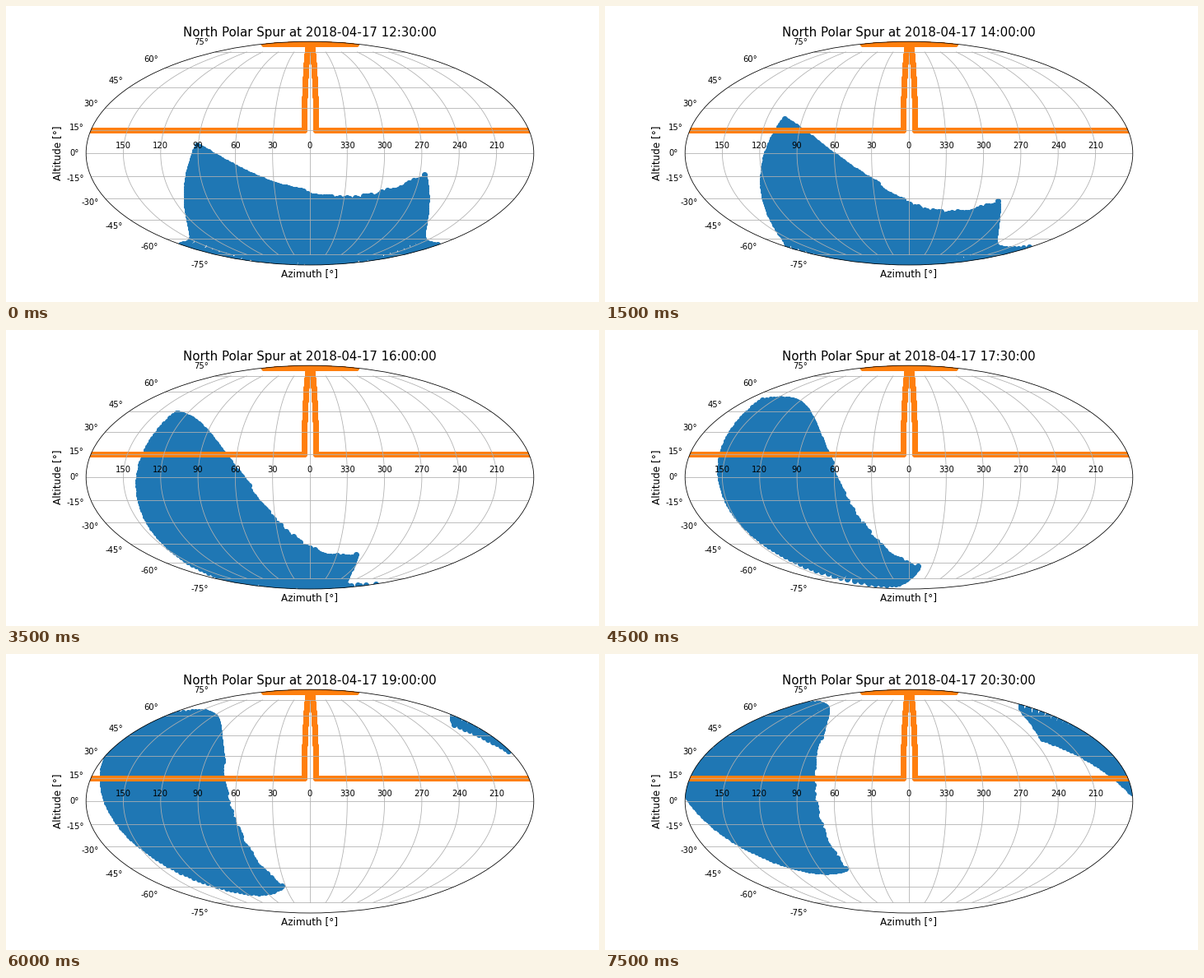
Write a matplotlib script that moves like this. It is 720 by 360 pixels and loops after 8000 ms.

```python
import numpy as np
import matplotlib.pyplot as plt
from matplotlib.animation import FuncAnimation

FRAMES, INTERVAL = 16, 500

# Observing site (degrees) and clock offset from UTC (hours)
LAT, LON, UTC_SHIFT = np.radians(37.9183), -122.1067, 7

# Galactic pole at the epoch of observation and longitude of the celestial pole
POLE_RA, POLE_DEC, POLE_L = np.radians([193.08, 27.03, 122.92])


def spur_grid(step=2.0):
    """Galactic grid over l = 210..380, b = 0..90 with equal spacing on the sky."""
    rows = []
    for b in np.arange(0, 90, step):
        l = np.arange(210, 380.01, step / np.cos(np.radians(b)))
        rows.append(np.column_stack([l, np.full(l.size, b)]))
    return np.radians(np.vstack(rows)).T


def to_equatorial(l, b):
    dl = POLE_L - l
    dec = np.arcsin(np.sin(POLE_DEC) * np.sin(b)
                    + np.cos(POLE_DEC) * np.cos(b) * np.cos(dl))
    ra = POLE_RA + np.arctan2(
        np.cos(b) * np.sin(dl),
        np.cos(POLE_DEC) * np.sin(b) - np.sin(POLE_DEC) * np.cos(b) * np.cos(dl))
    return ra, dec


def sidereal(hour):
    days = 6680.5 + (hour + UTC_SHIFT) / 24
    return np.radians((280.46062 + 360.98564737 * days + LON) % 360)


def to_horizon(ra, dec, hour):
    ha = sidereal(hour) - ra
    alt = np.arcsin(np.sin(LAT) * np.sin(dec)
                    + np.cos(LAT) * np.cos(dec) * np.cos(ha))
    az = np.arctan2(-np.cos(dec) * np.sin(ha),
                    np.sin(dec) * np.cos(LAT)
                    - np.cos(dec) * np.sin(LAT) * np.cos(ha))
    return az, alt


def clock(i):
    # one half-hour step is left out of the sequence
    return 12.5 + 0.5 * i + (0.5 if i >= 9 else 0)


def limits():
    """Outline of the reachable sky, azimuth growing to the left."""
    az = np.linspace(5, 355, 500)
    az = np.where(az > 180, az - 360, az)
    alt = np.linspace(15, 85, 100)
    full = np.linspace(-180, 180, 300)
    x = np.concatenate([-az, full, np.full(100, -5.0), np.full(100, 5.0)])
    y = np.concatenate([np.full(500, 15.0), np.full(300, 85.0), alt, alt])
    return np.radians(x), np.radians(y)


fig = plt.figure(figsize=(10, 5), dpi=72, facecolor="white")
fig.subplots_adjust(left=0.125, right=0.9, bottom=0.125, top=0.88)
ax = fig.add_subplot(projection="mollweide")
ax.set_xticks(np.radians(np.arange(-150, 151, 30)))
ax.set_xticklabels([150, 120, 90, 60, 30, 0, 330, 300, 270, 240, 210])
ax.set_xlabel("Azimuth [°]", fontsize=12)
ax.set_ylabel("Altitude [°]", fontsize=12)
title = ax.set_title("", fontsize=15, y=1.0)
ax.grid(True)

ra, dec = to_equatorial(*spur_grid())
spur = ax.scatter(np.zeros(ra.size), np.zeros(ra.size), color="C0")
ax.scatter(*limits(), color="C1")


def update(i):
    hour = clock(i)
    az, alt = to_horizon(ra, dec, hour)
    spur.set_offsets(np.column_stack([-az, alt]))
    title.set_text(f"North Polar Spur at 2018-04-17 "
                   f"{int(hour):02d}:{int(hour % 1 * 60):02d}:00")
    return spur, title


anim = FuncAnimation(fig, update, frames=FRAMES, interval=INTERVAL,
                     repeat=True, repeat_delay=0, blit=False)
plt.show()
```
